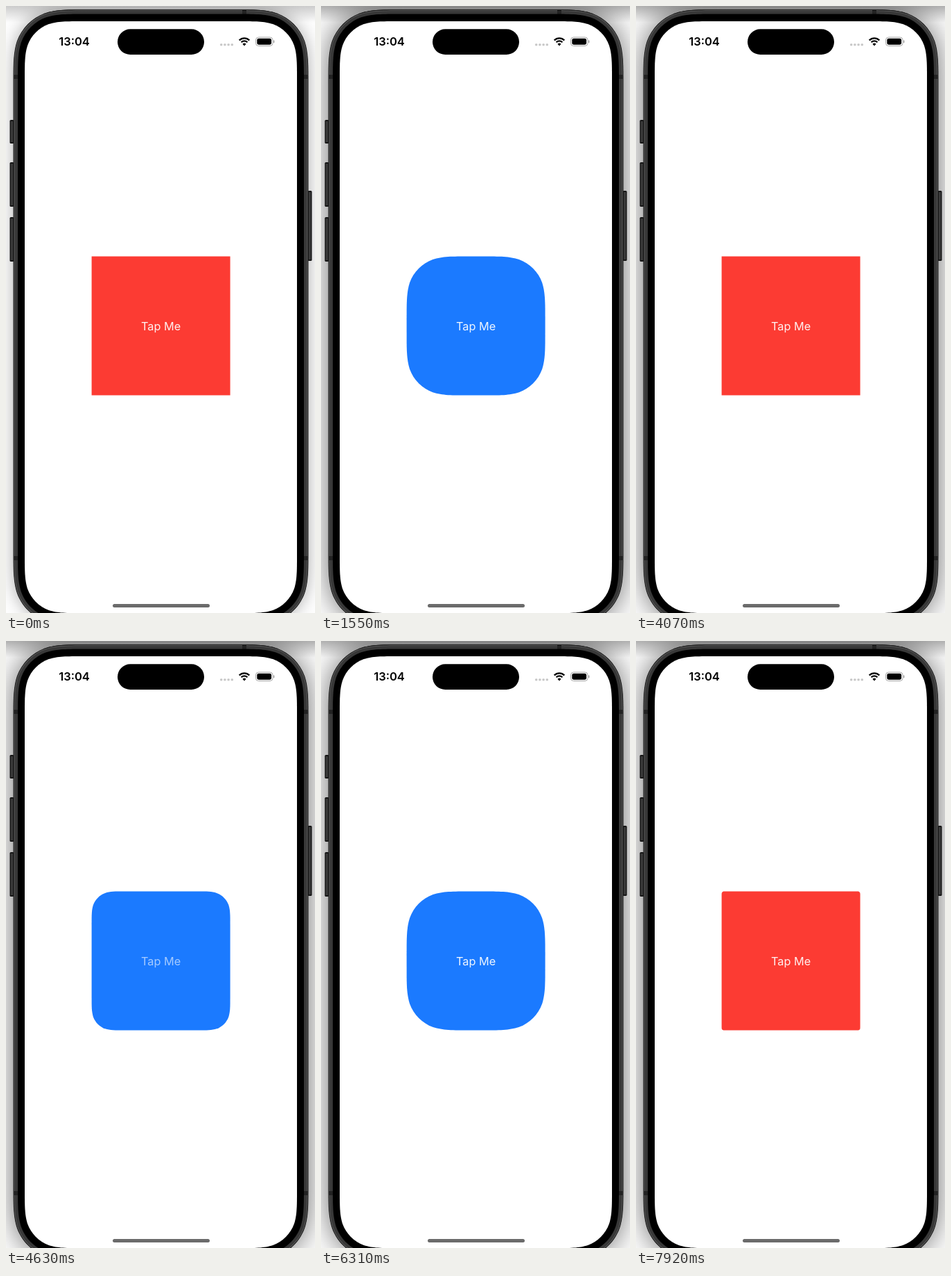
Write an HTML page with a canvas that moves like this. It is 446 by 874 pixels and loops after 7990 ms.

```html
<!DOCTYPE html>
<html lang="en">
<head>
<meta charset="utf-8">
<title>Tap Me</title>
<style>
html, body { margin: 0; width: 100%; height: 100%; overflow: hidden; background: #fff; }
canvas { display: block; width: 446px; height: 874px; }
</style>
</head>
<body>
<canvas id="stage"></canvas>
<script>
const W = 446, H = 874, LOOP = 7990, STEP = 70, FOCUS = 500;
const FONT = 'Inter, "Liberation Sans", sans-serif';
const RED = '#fc3b33', BLUE = '#1b7aff';
const RADIUS = 60;

// each tap: finger down, finger up, and whether the box ends up round and blue
const taps = [
  { down: 600, up: 650, on: true },
  { down: 2490, up: 2606, on: false },
  { down: 4380, up: 4430, on: true },
  { down: 6640, up: 6736, on: false }
];

const canvas = document.getElementById('stage');
const ctx = canvas.getContext('2d');
const dpr = window.devicePixelRatio || 1;
canvas.width = W * dpr;
canvas.height = H * dpr;

// rectangle with continuous-curvature corners
function squircle(x, y, w, h, r) {
  const edge = Math.min(1.5287 * r, w / 2, h / 2);
  const cx = x + w / 2, cy = y + h / 2;
  const corner = (sx, sy, swap) => {
    const at = (a, b) => {
      const [u, v] = swap ? [b, a] : [a, b];
      return [cx + sx * (w / 2 - u), cy + sy * (h / 2 - v)];
    };
    const curve = (a, b, c) => ctx.bezierCurveTo(...at(...a), ...at(...b), ...at(...c));
    ctx.lineTo(...at(edge, 0));
    curve([Math.min(1.0885 * r, edge), 0], [0.8684 * r, 0], [0.6315 * r, 0.0749 * r]);
    curve([0.3728 * r, 0.1691 * r], [0.1691 * r, 0.3728 * r], [0.0749 * r, 0.6315 * r]);
    curve([0, 0.8684 * r], [0, Math.min(1.0885 * r, edge)], [0, edge]);
  };
  ctx.beginPath();
  corner(1, -1, false);
  corner(1, 1, true);
  corner(-1, 1, false);
  corner(-1, -1, true);
  ctx.closePath();
}

function fillSquircle(color, ...box) {
  squircle(...box);
  ctx.fillStyle = color;
  ctx.fill();
}

function pill(color, x, y, w, h, r) {
  ctx.beginPath();
  ctx.roundRect(x, y, w, h, r);
  ctx.fillStyle = color;
  ctx.fill();
}

function rect(color, x, y, w, h) {
  ctx.fillStyle = color;
  ctx.fillRect(x, y, w, h);
}

function text(str, x, y, size, weight, color, align) {
  ctx.font = `${weight} ${size}px ${FONT}`;
  ctx.textAlign = align;
  ctx.fillStyle = color;
  ctx.fillText(str, x, y);
}

function drawBackdrop(focused) {
  rect('#fff', 0, 0, W, H);
  ctx.save();
  ctx.shadowColor = `rgba(0,0,0,${focused ? 0.58 : 0.34})`;
  ctx.shadowBlur = (focused ? 44 : 26) * dpr;
  fillSquircle('#111', 11, 5, 425, 886, 72);
  ctx.restore();
  const shade = ctx.createLinearGradient(0, 0, 0, 24);
  shade.addColorStop(0, `rgba(0,0,0,${focused ? 0.3 : 0.2})`);
  shade.addColorStop(1, 'rgba(0,0,0,0)');
  rect(shade, 0, 0, W, 24);
}

function sideButton(x, y, h) {
  pill('#161616', x, y, 6, h, 1.5);
  rect('#3a3a3a', x + 1.5, y + 2, 3, h - 4);
}

function drawPhone() {
  sideButton(5.5, 164, 34);
  sideButton(5.5, 225, 64);
  sideButton(5.5, 304, 64);
  sideButton(435.5, 266, 101);

  fillSquircle('#161616', 10.5, 5, 426, 886, 72);
  fillSquircle('#5a5a5a', 11.5, 6, 424, 884, 71);
  fillSquircle('#383838', 12.5, 7, 422, 882, 70);
  for (const y of [99, 792]) {
    rect('#222', 11.5, y, 6, 6);
    rect('#222', 429.5, y, 6, 6);
  }
  rect('#222', 341, 6, 6, 6);
  fillSquircle('#000', 17, 11.5, 413, 873, 65);
  fillSquircle('#fff', 27, 22, 393, 852, 55);
}

function drawStatus() {
  pill('#000', 161, 33.3, 125, 36.7, 18.35);
  text('13:04', 98.5, 57, 16.5, 600, '#000', 'center');

  ctx.fillStyle = '#c8c8c8';
  for (let i = 0; i < 4; i++) {
    ctx.beginPath();
    ctx.arc(310.7 + i * 5.2, 55.7, 1.8, 0, Math.PI * 2);
    ctx.fill();
  }

  // wifi fan
  ctx.strokeStyle = '#000';
  ctx.lineWidth = 2.3;
  for (const r of [6.2, 10.3]) {
    ctx.beginPath();
    ctx.arc(344, 56.6, r, -Math.PI * 0.75, -Math.PI * 0.25);
    ctx.stroke();
  }
  ctx.beginPath();
  ctx.moveTo(344, 57.4);
  ctx.arc(344, 57.2, 3.6, -Math.PI * 0.75, -Math.PI * 0.25);
  ctx.closePath();
  ctx.fillStyle = '#000';
  ctx.fill();

  // battery
  ctx.beginPath();
  ctx.roundRect(360.5, 45, 24.5, 12.5, 4);
  ctx.strokeStyle = '#a5a5a5';
  ctx.lineWidth = 1;
  ctx.stroke();
  pill('#000', 362.3, 46.8, 20.8, 8.9, 2.4);
  pill('#a5a5a5', 386, 49.2, 1.4, 4, 0.7);

  pill('#6b6b6b', 154, 861, 140, 5, 2.5);
}

// underdamped spring from 0 to 1, one second response, damping 0.4
function spring(s) {
  const w0 = 2 * Math.PI, z = 0.4, wd = w0 * Math.sqrt(1 - z * z);
  return 1 - Math.exp(-z * w0 * s) * (Math.cos(wd * s) + z * w0 / wd * Math.sin(wd * s));
}

function boxState(t) {
  let round = 0, on = false, label = 1;
  for (const tap of taps) {
    if (t >= tap.down) label = 0.17;
    if (t < tap.up) continue;
    const p = spring((t - tap.up) / 1000);
    round = tap.on ? p : 1 - p;
    on = tap.on;
    label = Math.min(1, 0.17 + 0.83 * (t - tap.up) / 340);
  }
  return { radius: Math.max(0, round * RADIUS), on, label };
}

function drawBox(t) {
  const { radius, on, label } = boxState(t);
  fillSquircle(on ? BLUE : RED, 123.6, 360.6, 200, 200, radius);
  text('Tap Me', 223.6, 466.6, 16.3, 400, `rgba(255,255,255,${0.93 * label})`, 'center');
}

function draw(t) {
  ctx.setTransform(dpr, 0, 0, dpr, 0, 0);
  drawBackdrop(t >= FOCUS);
  drawPhone();
  drawStatus();
  drawBox(t);
}

const start = performance.now();
function tick() {
  const t = (performance.now() - start) % LOOP;
  draw(t < FOCUS ? 0 : FOCUS + Math.floor((t - FOCUS) / STEP) * STEP);
  requestAnimationFrame(tick);
}
tick();
</script>
</body>
</html>
```
